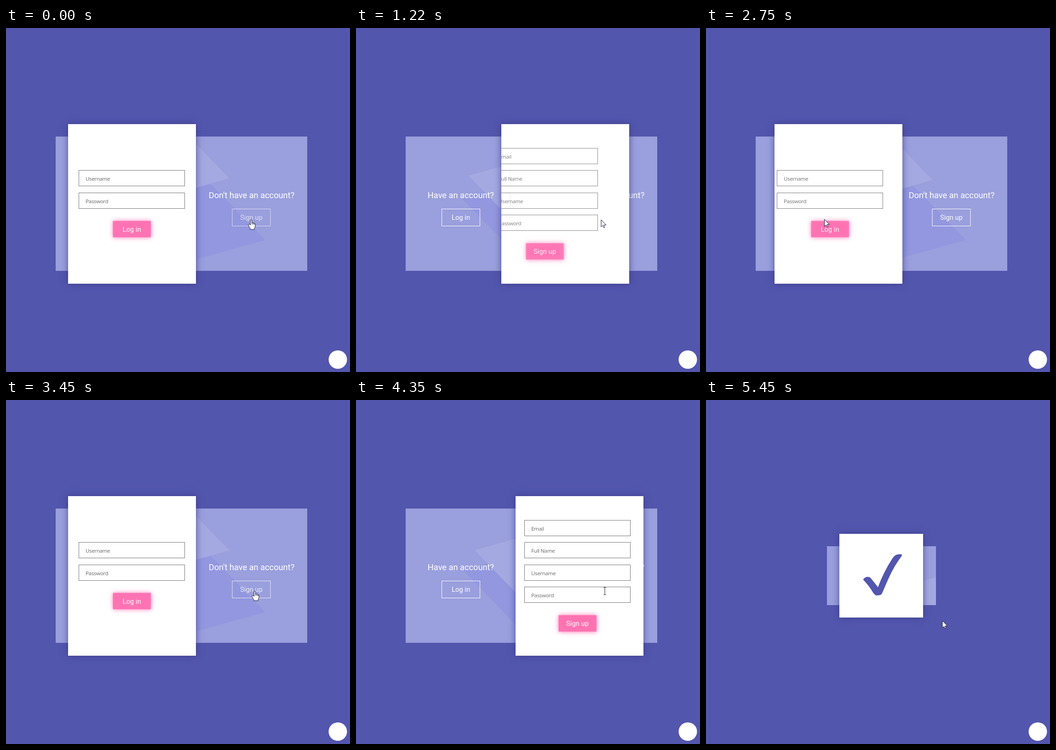
Recreate the animation shown at these times as an HTML page with a canvas. Size 748 by 748 pixels, loop 5.8 s.

```html
<!DOCTYPE html>
<html lang="en">
<head>
<meta charset="utf-8">
<title>Log in / Sign up</title>
<style>
html, body { margin: 0; width: 100%; height: 100%; overflow: hidden; background: #5356ad; }
canvas { display: block; }
</style>
</head>
<body>
<canvas id="stage" width="748" height="748"></canvas>
<script>
const ctx = document.getElementById('stage').getContext('2d');
const LOOP = 5800, FADE = 500;
const PINK = '#ff73b3', BG = '#5356ad';
const UI = 'Roboto, sans-serif';

const clamp = v => Math.min(1, Math.max(0, v));
const lerp = (a, b, p) => a + (b - a) * p;
const mix = (a, b, p) => [lerp(a[0], b[0], p), lerp(a[1], b[1], p)];
const smooth = v => { v = clamp(v); return v * v * (3 - 2 * v); };

// CSS "ease": cubic-bezier(.25, .1, .25, 1)
function ease(x) {
  x = clamp(x);
  let lo = 0, hi = 1;
  for (let i = 0; i < 24; i++) {
    const s = (lo + hi) / 2;
    if (.75 * s * (1 - s) + s * s * s < x) lo = s; else hi = s;
  }
  const s = lo, r = 1 - s;
  return x === 1 ? 1 : .3 * s * r * r + 3 * s * s * r + s * s * s;
}
const fade = (t, start) => ease((t - start) / FADE);

function step(t) {
  if (t < 940) return 0;
  if (t < 1420) return 940 + 50 * Math.floor((t - 940) / 50);
  return Math.max(1420, 50 * Math.floor(t / 50));
}

function slideAt(t) {
  if (t < 1500) return fade(t, 919);
  if (t < 3000) return 1 - fade(t, 2405);
  return fade(t, 3926);
}

function text(str, x, y, font, color = '#fff', align = 'center', spacing = '0px') {
  ctx.font = font;
  ctx.fillStyle = color;
  ctx.textAlign = align;
  ctx.letterSpacing = spacing;
  ctx.fillText(str, x, y);
}

function fillGlow(x, y, w, h, color, glow, blur) {
  ctx.save();
  ctx.shadowColor = glow;
  ctx.shadowBlur = blur;
  ctx.fillStyle = color;
  ctx.fillRect(x, y, w, h);
  ctx.restore();
}

function clipTo(x, y, w, h) {
  ctx.beginPath();
  ctx.rect(x, y, w, h);
  ctx.clip();
}

// Parallelogram from its left and right corners with fixed edge slopes
function shard(l, r, color) {
  const steep = 1.03, flat = -.28;
  const meet = (a, ka, b, kb) => {
    const x = (b[1] - a[1] + ka * a[0] - kb * b[0]) / (ka - kb);
    return [x, a[1] + ka * (x - a[0])];
  };
  ctx.beginPath();
  for (const p of [l, meet(l, flat, r, steep), r, meet(l, steep, r, flat)]) ctx.lineTo(...p);
  ctx.fillStyle = color;
  ctx.fill();
}

function panelAt(p) {
  const w = lerp(547, 237, p), h = lerp(292, 127.6, p);
  return { x: Math.round(381.5 - w / 2), y: Math.round(382.1 - h / 2), w: Math.round(w), h: Math.round(h) };
}

function boxAt(panel, slide, p) {
  const x = panel.x + lerp(27.4 + 214.4 * slide, 27.4, p);
  const w = lerp(278.4, 182.4, p), h = lerp(346.6, 182.4, p);
  return { x: Math.round(x), y: Math.round(382.2 - h / 2), w: Math.round(w), h: Math.round(h) };
}

function outlineButton(label, x, alpha) {
  ctx.save();
  ctx.globalAlpha = alpha;
  ctx.strokeStyle = '#fff';
  ctx.lineWidth = 1;
  ctx.strokeRect(x - 41.5, 393.5, 83, 37);
  text(label, x, 417, '14.8px ' + UI);
  ctx.restore();
}

function drawPanel(t, panel, slide, p) {
  const { x, y, w, h } = panel;
  ctx.save();
  clipTo(x, y, w, h);
  ctx.fillStyle = '#9a9fdd';
  ctx.fillRect(x, y, w, h);
  ctx.translate(x - 108, y - 236);
  shard(mix([213, 372], [233, 370], slide), mix([563.5, 461], [584, 459], slide), '#9297df');
  shard(mix([167, 290], [259, 327], slide), mix([486, 327], [599, 384], slide), '#a4a9e1');
  const font = '18.24px ' + UI, active = p > 0;
  ctx.globalAlpha = 1 - p;
  text('Have an account?', active ? 228.5 : 228, active ? 271 : 370, font);
  text("Don't have an account?", active ? 260.5 : 534, active ? 329.5 : 370, font);
  ctx.restore();
  if (active) return;
  const inHover = t > 2100 && t < 3000 ? fade(t, 2080) : 0;
  const upHover = t < 1500 ? 1 : fade(t, 3270);
  outlineButton('Log in', 228, 1 - .35 * inHover);
  outlineButton('Sign up', 533.5, 1 - .35 * upHover);
}

function drawForm(left, alpha, fields, first, label, buttonAlpha = 1) {
  if (alpha <= 0) return;
  ctx.save();
  ctx.globalAlpha = alpha;
  ctx.strokeStyle = '#757575';
  ctx.lineWidth = 1;
  const x = Math.floor(left + 23.6) + .5;
  fields.forEach((name, i) => {
    const y = Math.floor(261.4 + 48.3 * (first + i)) + .5;
    ctx.strokeRect(x, y, 230, 34);
    text(name, x + 14.5, y + 22, '11.6px "Noto Sans", sans-serif', '#707070', 'left', '-0.4px');
  });
  const y = 419.5 + 48.4 * (first ? 0 : 1);
  ctx.globalAlpha = alpha * buttonAlpha;
  fillGlow(x + 74, y, 82.3, 35.6, PINK, PINK, 10);
  text(label, x + 115, y + 23.1, '14.8px ' + UI);
  ctx.restore();
}

function drawCheck(box, p) {
  ctx.save();
  ctx.globalAlpha = p;
  ctx.translate(box.x + lerp(98.5, 0, p) - 290, box.y - lerp(50, 0, p) - 291);
  ctx.fillStyle = BG;
  ctx.fill(new Path2D('M342 390Q345 385 351 384.5Q356 384.5 358 387L374 407Q386 374 405 345' +
    'Q410 337 416 336Q421 335 425 335.5Q427 337 425 340Q409 361 397 388Q389 406 383 420' +
    'Q381 424 377 424.5L370 425Q367 424 364 420Q354 403 342 391Z'));
  ctx.restore();
}

function drawBox(t, box, slide, p) {
  const { x, y, w, h } = box;
  fillGlow(x, y, w, h, '#fff', 'rgba(52,54,128,.75)', 14);
  ctx.save();
  clipTo(x, y, w, h);
  if (p > 0) {
    drawCheck(box, p);
  } else {
    drawForm(x - 278 * slide, 1 - slide, ['Username', 'Password'], 1, 'Log in');
    drawForm(x - 278 * (1 - slide), slide, ['Email', 'Full Name', 'Username', 'Password'], 0,
      'Sign up', 1 - .3 * fade(t, 4700));
  }
  ctx.restore();
}

const arrow = new Path2D('M0 0V15.5L3.5 12.2L5.8 17.2L8 16.2L5.8 11.3H10.8Z');
const hand = new Path2D('M-1.6 11.5V1.6Q-1.4 0 0 0Q1.5 0 1.6 1.6V6.2Q3.6 5.4 4.4 7Q6.3 6.4 6.9 8' +
  'Q9 7.8 9 10V14Q8.8 16.5 7 18.6V21H-2V18.8Q-4 16.5 -5.8 12.2Q-6.4 10 -4.8 9.4Q-3.4 9.4 -1.6 11.5Z');
const knuckles = new Path2D('M1.6 6.2V10M4.4 7V10.4M6.9 8V10.8');
const beam = new Path2D('M-2.5 -8H-.8L0 -7.4L.8 -8H2.5M0 -7.4V7.4M-2.5 8H-.8L0 7.4L.8 8H2.5');

function pointerAt(t) {
  if (t < 2600) return mix([533, 417], [257.5, 416], smooth((t - 1675) / 500));
  if (t < 4500) return mix([257.5, 416], [541, 415.5], smooth((t - 2975) / 450));
  return mix([541, 415.5], [514, 480], smooth((t - 4525) / 275));
}

function pointerKind(x, y, box, slide, p) {
  if (p > 0) return 'arrow';
  const within = (l, r, top, bottom) => x > l && x < r && y > top && y < bottom;
  if (within(box.x, box.x + box.w, box.y, box.y + box.h)) {
    const left = box.x - 278 * (1 - slide);
    if (within(left + 24, left + 254, 406, 441)) return 'beam';
    return within(left + 98, left + 180, 468, 504) ? 'hand' : 'arrow';
  }
  return within(186, 270, 393, 431) || within(491, 576, 393, 431) ? 'hand' : 'arrow';
}

function drawPointer(t, box, slide, p) {
  const [x, y] = pointerAt(t);
  const kind = pointerKind(x, y, box, slide, p);
  ctx.save();
  ctx.translate(x, y);
  ctx.strokeStyle = '#16163a';
  ctx.fillStyle = '#fff';
  ctx.lineWidth = 1;
  ctx.lineJoin = 'round';
  if (kind === 'beam') {
    ctx.stroke(beam);
  } else {
    const shape = kind === 'hand' ? hand : arrow;
    ctx.fill(shape);
    ctx.stroke(shape);
    if (kind === 'hand') ctx.stroke(knuckles);
  }
  ctx.restore();
}

function draw(time) {
  const t = step(time % LOOP);
  const slide = slideAt(t), p = fade(t, 4908);
  const panel = panelAt(p), box = boxAt(panel, slide, p);
  ctx.fillStyle = BG;
  ctx.fillRect(0, 0, 748, 748);
  drawPanel(t, panel, slide, p);
  drawBox(t, box, slide, p);
  ctx.fillStyle = '#fff';
  ctx.beginPath();
  ctx.arc(721.5, 721, 20, 0, Math.PI * 2);
  ctx.fill();
  drawPointer(t, box, slide, p);
}

const begin = performance.now();
function tick() {
  draw(performance.now() - begin);
  requestAnimationFrame(tick);
}
tick();
</script>
</body>
</html>
```
